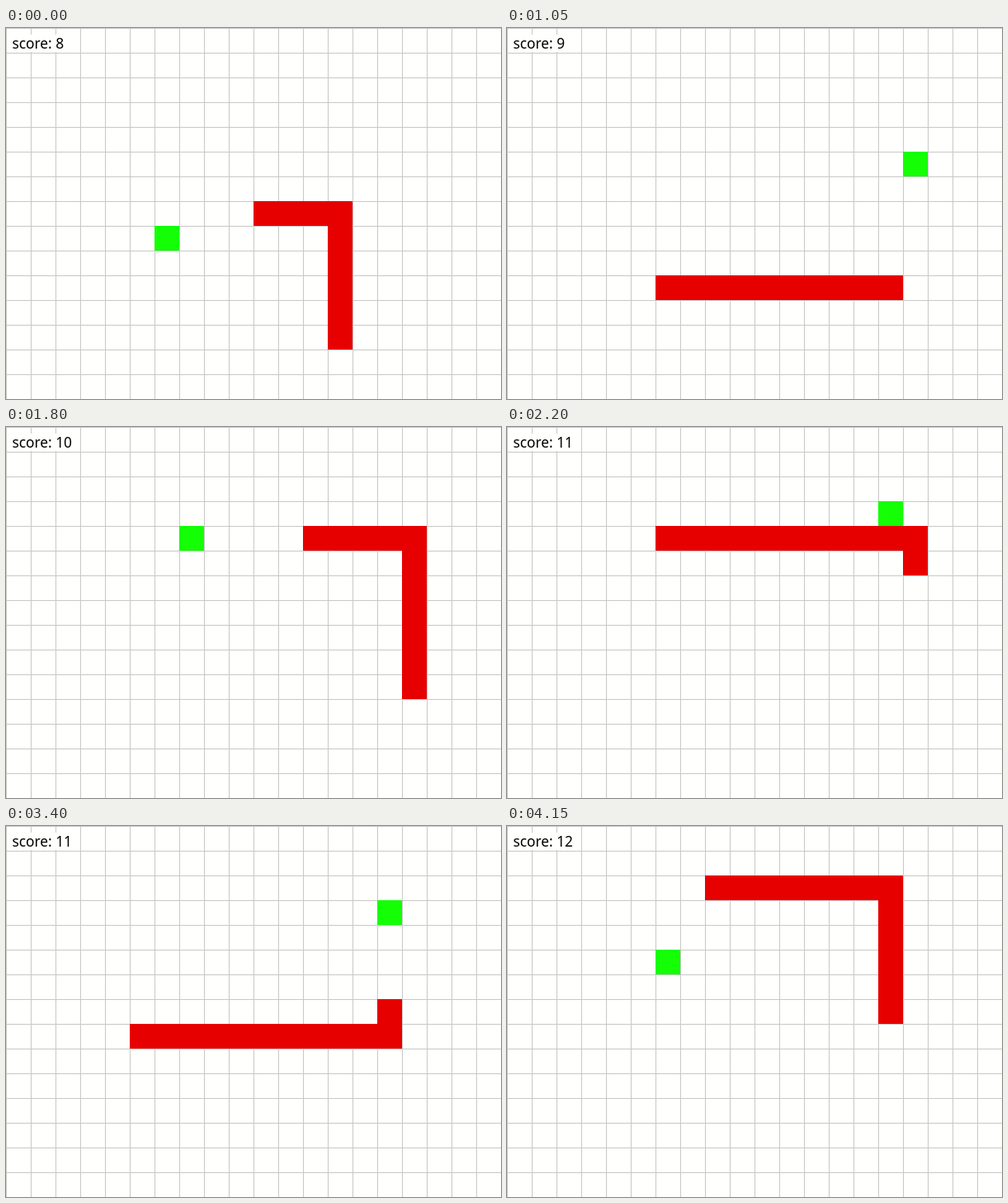
These frames come from a looping animation (600x450 px, 4200 ms). An HTML page with a canvas:

```html
<!DOCTYPE html>
<html lang="en">
<head>
<meta charset="utf-8">
<title>Snake</title>
<style>
  html, body { margin: 0; width: 100%; height: 100%; overflow: hidden; background: #fffffd; }
  canvas { display: block; position: absolute; left: 0; top: 0; }
  #score {
    position: absolute; left: 7.5px; top: 8px; height: 21px;
    background: #fffffd; color: #000; white-space: pre;
    font: 17.3px/21px "Noto Sans", "Open Sans", sans-serif;
  }
</style>
</head>
<body>
<canvas id="board" width="600" height="450"></canvas>
<div id="score">score: 8</div>
<script>
const CELL = 30, COLS = 20, ROWS = 15;
const LOOP = 4200, TICK = 50, STEP = 66.1, PHASE = 32.5;
const START_SCORE = 8;

// Corners of the snake's route, from its first tail cell to its last head cell.
const corners = [
  [13, 12], [13, 7], [6, 7], [6, 10], [16, 10], [16, 4],
  [4, 4], [4, 8], [15, 8], [15, 2], [8, 2]
];

// Food cells in order, each with the step on which the head reaches it.
const foods = [
  { cell: [6, 8], eaten: 5 },
  { cell: [16, 5], eaten: 22 },
  { cell: [7, 4], eaten: 32 },
  { cell: [15, 3], eaten: 55 },
  { cell: [6, 5], eaten: Infinity }
];

const ctx = document.getElementById("board").getContext("2d");
const label = document.getElementById("score");

function walk(points) {
  const cells = [points[0]];
  let [x, y] = points[0];
  for (const [tx, ty] of points.slice(1)) {
    while (x !== tx || y !== ty) {
      x += Math.sign(tx - x);
      y += Math.sign(ty - y);
      cells.push([x, y]);
    }
  }
  return cells;
}

const route = walk(corners);

function stepAt(time) {
  const tick = Math.floor(time / TICK) * TICK;
  return Math.ceil((tick + TICK - PHASE) / STEP) - 1;
}

function fillCell([x, y], color) {
  ctx.fillStyle = color;
  ctx.fillRect(x * CELL, y * CELL, CELL, CELL);
}

function drawGrid() {
  ctx.fillStyle = "#fffffd";
  ctx.fillRect(0, 0, 600, 450);
  ctx.fillStyle = "#c8c8c8";
  for (let i = 0; i < COLS; i++) ctx.fillRect(i * CELL, 0, 1, 450);
  for (let j = 0; j < ROWS; j++) ctx.fillRect(0, j * CELL, 600, 1);
}

function draw(step) {
  const count = foods.filter(f => f.eaten < step).length;
  const score = START_SCORE + count;
  const head = step + START_SCORE;
  drawGrid();
  fillCell(foods[count].cell, "#14ff05");
  for (const cell of route.slice(head - score, head + 1)) fillCell(cell, "#e60000");
  label.textContent = "score: " + score;
}

const begin = performance.now();
let shown = -1;

function frame() {
  const step = stepAt((performance.now() - begin) % LOOP);
  if (step !== shown) draw(shown = step);
  requestAnimationFrame(frame);
}

frame();
</script>
</body>
</html>
```
